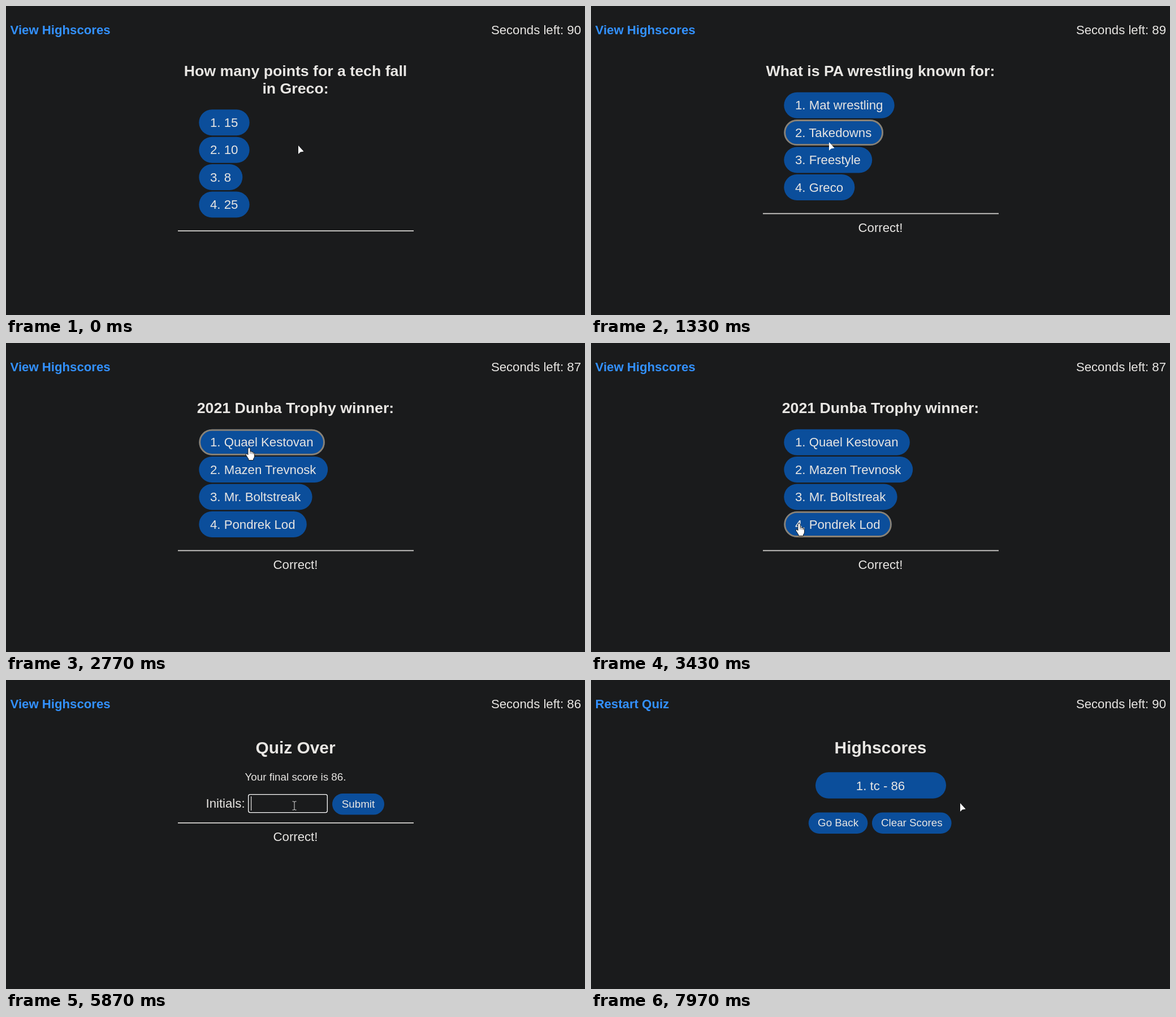
Write an HTML page that moves like this. It is 1024x547 px and loops after 8000 ms.

```html
<!DOCTYPE html>
<html lang="en">
<head>
<meta charset="utf-8">
<title>Quiz</title>
<style>
  html, body { margin: 0; width: 100%; height: 100%; overflow: hidden; background: #1a1b1c; }
  svg { display: block; width: 100%; height: 100%; font: 22.2px "Liberation Sans", Arial, sans-serif; fill: #e8e6e3; }
</style>
</head>
<body>
<svg id="stage" viewBox="0 0 1024 547"></svg>
<script>
const LOOP = 8000, FADE = 150;
const BLUE = '#0b4e9b', RING = '#8c8273', DARK = '#1a1b1c';
const stage = document.getElementById('stage');
const measure = document.createElement('canvas').getContext('2d');
measure.font = '22.2px "Liberation Sans", Arial, sans-serif';

const questions = [
  { start: 0, title: ['How many points for a tech fall', 'in Greco:'], options: ['15', '10', '8', '25'] },
  { start: 1300, title: ['What is PA wrestling known for:'],
    options: ['Mat wrestling', 'Takedowns', 'Freestyle', 'Greco'] },
  { start: 2770, title: ['2021 Dunba Trophy winner:'],
    options: ['Quael Kestovan', 'Mazen Trevnosk', 'Mr. Boltstreak', 'Pondrek Lod'] },
];
const ANSWERED = 900, OVER = 3570, FOCUS = 4830, SCORES = 7100;

// [option, pointer enters, pointer leaves]
const hovers = [[2, 780, 980], [1, 980, 1745], [0, 1750, 2890], [1, 2900, 3080], [2, 3090, 3270], [3, 3280, 4000]];
// [time, x, y]
const path = [
  [0, 517, 247], [400, 517, 247], [880, 425, 296], [920, 425, 296], [1130, 421, 241], [1370, 421, 241],
  [1930, 430, 185], [2770, 430, 185], [3430, 368, 319], [3570, 368, 319], [3630, 368, 331], [3870, 368, 331],
  [4430, 510, 222], [6470, 510, 222], [6900, 655, 217], [7960, 655, 217], [7970, 653, 218], [LOOP, 653, 218],
];
const pointers = [[0, 'arrow'], [760, 'hand'], [1300, 'arrow'], [1400, 'hand'], [OVER, 'arrow'],
  [4260, 'beam'], [6650, 'arrow'], [6675, 'hand'], [SCORES, 'arrow']];
const shapes = {
  arrow: '<path d="M0 0V15L3.6 11.5L9.5 10.5Z" fill="#fff"/>',
  hand: `<path d="M-2 1.5Q0 -1 2 1.5V7Q4 6 5 8Q7 7 7.5 9Q9.5 9 9.5 11V16Q9 19 7.5 20V22.5H-1V20.5
    L-5.5 13.5Q-6.5 10.5 -4 11L-2 13Z" fill="#fff" stroke="#111" stroke-width=".9"/>
    <path d="M2 7V11M5 8V11.5M7.5 9V12" stroke="#222" stroke-width=".8"/>`,
  beam: '<path d="M-3.5 -7H-1L0 -6L1 -7H3.5M0 -6V7M-3.5 8H-1L0 7L1 8H3.5" fill="none" stroke="#ddd"/>',
};

const clamp = v => Math.max(0, Math.min(1, v));
const ease = v => v * v * (3 - 2 * v);
const latest = (list, t, key) => list.filter(item => item[key] <= t).pop();

function text(str, x, y, { size = 22.2, anchor = 'start', bold = false, color = '#e8e6e3' } = {}) {
  return `<text x="${x}" y="${y}" font-size="${size}" text-anchor="${anchor}" fill="${color}"
    font-weight="${bold ? 700 : 400}">${str}</text>`;
}
const centered = (str, y, size, bold) => text(str, 512, y, { size, bold, anchor: 'middle' });
const rule = y => `<rect x="304" y="${y - 0.9}" width="417" height="1.8" fill="#d3d1ce"/>`;

function pill(x, y, w, h, ring = 0, fill = 1) {
  const box = (inset, style) => `<rect x="${x + inset}" y="${y + inset}" width="${w - 2 * inset}"
    height="${h - 2 * inset}" rx="${h / 2 - inset}" ${style}/>`;
  return box(0, `fill="${BLUE}" fill-opacity="${fill}"`) +
    (ring ? box(1.4, `fill="none" stroke="${RING}" stroke-width="2.8" stroke-opacity="${ring}"`) : '');
}

function header(link, seconds) {
  return text(link, 7.5, 50, { bold: true, color: '#3391ff' }) +
    text(`Seconds left: ${seconds}`, 1017, 50, { anchor: 'end' });
}

function ringOf(option, t) {
  return Math.max(...hovers.map(([o, enter, leave]) =>
    o === option ? clamp((t - enter) / FADE) * clamp(1 - (t - leave) / FADE) : 0));
}

function quizPage(t) {
  const { title, options } = latest(questions, t, 'start');
  const drop = (title.length - 1) * 30.6;
  const rows = options.map((option, i) => {
    const label = `${i + 1}. ${option}`, y = 152.7 + drop + i * 48.4;
    return pill(341.3, y, measure.measureText(label).width + 40, 46, ringOf(i, t)) + text(label, 361, y + 30.7);
  });
  return header('View Highscores', 90 - Math.floor((t + 230) / 1000)) +
    title.map((line, i) => centered(line, 124 + i * 30.6, 26.7, true)).join('') + rows.join('') +
    rule(367.5 + drop) + (t >= ANSWERED ? centered('Correct!', 400 + drop) : '');
}

function overPage(t) {
  const typed = 'tc'.slice(0, (t >= 5930) + (t >= 6030));
  const caretOn = t >= FOCUS && t < 5370 || t >= 5870 && t < 6530;
  const caretX = 433 + measure.measureText(typed).width;
  const edge = t >= FOCUS ? '#fff' : '#858585';
  return header('View Highscores', 86) + centered('Quiz Over', 130, 29.9, true) +
    centered('Your final score is 86.', 178, 18.8) + text('Initials:', 353.5, 226) +
    `<rect x="428.7" y="202.6" width="139.6" height="32" rx="3" fill="${DARK}" stroke="${edge}" stroke-width="1.3"/>` +
    text(typed, 433, 226) +
    (caretOn ? `<rect x="${caretX}" y="206" width="1.2" height="25"/>` : '') +
    pill(577, 201, 92, 37.6, clamp((t - 6675) / FADE)) +
    text('Submit', 623, 226, { size: 18.8, anchor: 'middle' }) +
    rule(253) + centered('Correct!', 285);
}

function scoresPage(t) {
  const fill = ease(clamp((t - 7150) / 240));
  const button = (label, x, w) => pill(x, 234.4, w, 37.6, 1 - fill, fill) +
    text(label, x + w / 2, 259.4, { size: 18.8, anchor: 'middle' });
  return header('Restart Quiz', 90) + centered('Highscores', 130, 29.9, true) +
    pill(397, 163.3, 231, 46.5) + centered('1. tc - 86', 194.5) +
    button('Go Back', 384.8, 104.5) + button('Clear Scores', 497, 140.5);
}

function cursor(t) {
  const i = path.findIndex(([end]) => end > t);
  const [t0, x0, y0] = path[i - 1], [t1, x1, y1] = path[i];
  const p = ease((t - t0) / (t1 - t0));
  return `<g transform="translate(${x0 + (x1 - x0) * p} ${y0 + (y1 - y0) * p})">${shapes[latest(pointers, t, 0)[1]]}</g>`;
}

function draw(now) {
  const t = Math.max(0, now) % LOOP;
  const page = t < OVER ? quizPage : t < SCORES ? overPage : scoresPage;
  stage.innerHTML = page(t) + cursor(t);
  requestAnimationFrame(draw);
}
requestAnimationFrame(draw);
</script>
</body>
</html>
```
